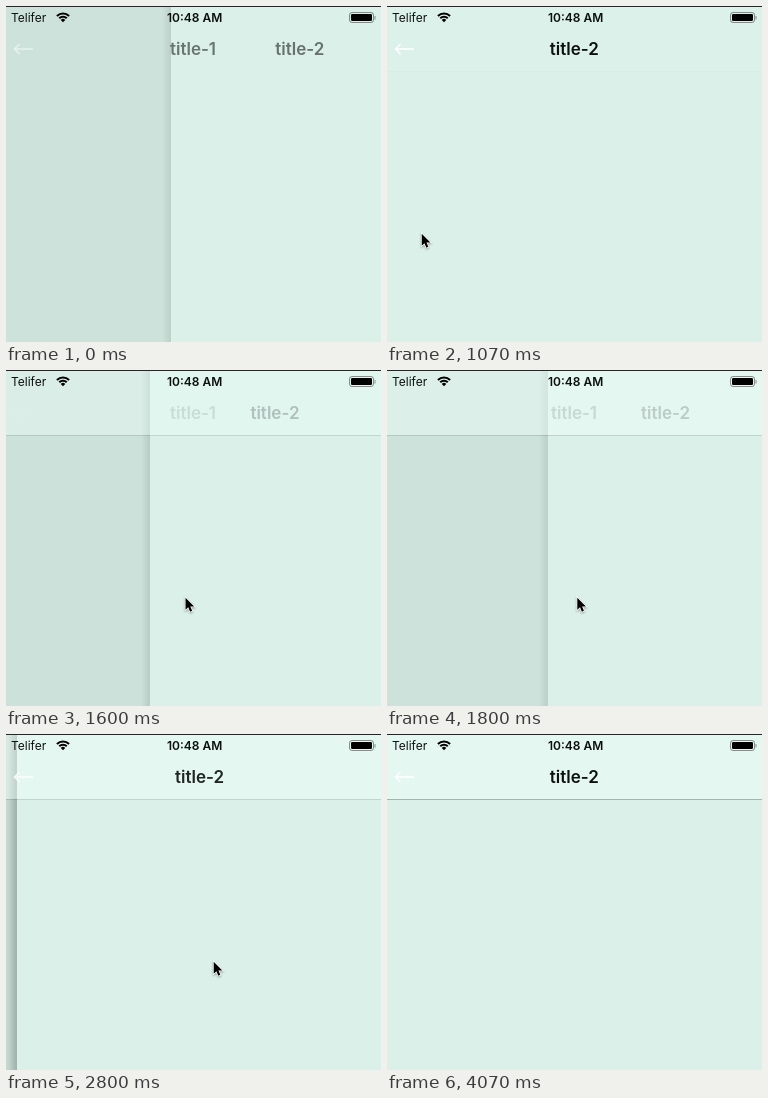
An HTML page with a canvas for the animation above (4340 ms loop, 375 by 336 pixels).

```html
<!DOCTYPE html>
<html lang="en">
<head>
<meta charset="utf-8">
<title>Swipe back</title>
<style>
  html, body { margin: 0; width: 100%; height: 100%; overflow: hidden; background: #daf0e8; }
  canvas { display: block; width: 375px; height: 336px; }
</style>
</head>
<body>
<canvas id="stage"></canvas>
<script>
const W = 375, H = 336, LOOP = 4340, STEP = 1000 / 15;
const PAGE = '#daf0e8';
const FONT = 'Inter, Roboto, sans-serif';

// Moments of the gesture, in steps of one fifteenth of a second.
const SHOW = 3, DRAG = 15, PAUSE = 28, NUDGE = 30, RELEASE = 40, LEAVE = 48, HIDE = 50;
const SPRING = 0.245; // share of the offset left after each step once released

const canvas = document.getElementById('stage');
const scale = window.devicePixelRatio || 1;
canvas.width = W * scale;
canvas.height = H * scale;
const c = canvas.getContext('2d');
c.scale(scale, scale);

const black = alpha => `rgba(0,0,0,${alpha})`;

// Ease-out progress from 0 to 1 between two steps.
function ease(step, from, to, power = 1) {
  const u = Math.min(1, Math.max(0, (step - from) / (to - from)));
  return 1 - (1 - u) ** power;
}

function springBack(offset, steps) {
  const left = offset * SPRING ** Math.max(0, steps);
  return left < 0.5 ? 0 : left;
}

function pageEdge(step) {
  if (step < DRAG) return springBack(165, step);
  const dragged = 162 * ease(step, DRAG + 1, PAUSE, 2) + 20.5 * ease(step, NUDGE, NUDGE + 2);
  return springBack(dragged, step - RELEASE);
}

function pointerPosition(step) {
  const exit = ease(step, LEAVE, HIDE);
  const approach = 1.65 * Math.max(0, 10 - step) ** 2;
  const drag = 189 * ease(step, DRAG, PAUSE, 2.4) + 17 * ease(step, NUDGE, NUDGE + 2);
  return [1 + approach + drag + 92 * exit, 226.5 - 88 * exit];
}

function rect(x, y, w, h, fill) {
  c.fillStyle = fill;
  c.fillRect(x, y, w, h);
}

function text(str, x, y, size, weight, align, alpha = 1) {
  c.font = `${weight} ${size}px ${FONT}`;
  c.textAlign = align;
  c.fillStyle = `rgba(12,16,15,${alpha})`;
  c.fillText(str, x, y);
}

const title = (str, x, alpha) => text(str, x, 49, 17, 600, 'center', alpha);

function drawPages(edge, p) {
  rect(0, 0, W, H, PAGE);
  if (edge <= 0) return;
  rect(0, 0, edge, H, black(0.105 * (1 - p)));
  const shadow = c.createLinearGradient(edge - 9, 0, edge, 0);
  shadow.addColorStop(0, black(0));
  shadow.addColorStop(1, black(0.2 * (1 - p) ** 1.5));
  rect(edge - 9, 0, 9, H, shadow);
}

function drawBar(step) {
  const shown = ease(step, DRAG, DRAG + 10);
  const settled = ease(step, RELEASE + 2, RELEASE + 6);
  rect(0, 0, W, 65, `rgba(240,255,252,${0.42 * shown})`);
  rect(0, 65, W, 1, black(0.12 * shown + 0.13 * settled));
}

function drawArrow(alpha) {
  c.strokeStyle = `rgba(255,255,255,${alpha})`;
  c.lineWidth = 1.5;
  c.stroke(new Path2D('M27 43H8.5M13.5 38L8.5 43L13.5 48'));
}

function drawWifi() {
  const from = -Math.PI * 0.75, to = -Math.PI * 0.25;
  c.strokeStyle = c.fillStyle = '#000';
  c.lineWidth = 2;
  for (const radius of [8.6, 5.3]) {
    c.beginPath();
    c.arc(57, 16, radius, from, to);
    c.stroke();
  }
  c.beginPath();
  c.moveTo(57, 16.2);
  c.arc(57, 16.2, 3.2, from, to);
  c.fill();
}

function drawBattery() {
  c.beginPath();
  c.roundRect(343.5, 6.5, 24, 10, 2.5);
  c.strokeStyle = black(0.42);
  c.lineWidth = 1;
  c.stroke();
  c.beginPath();
  c.roundRect(345, 8, 21, 7, 1.2);
  c.fillStyle = '#000';
  c.fill();
  rect(368.5, 10, 1, 3.5, black(0.42));
}

function drawStatus() {
  rect(0, 0, W, 1, '#222826');
  text('Telifer', 5, 16, 12, 400, 'left');
  text('10:48 AM', 188.7, 16, 12, 600, 'center');
  drawWifi();
  drawBattery();
}

const pointerShape = new Path2D('M0 0V14.2L3.2 11.2L5.4 16.4L7.8 15.4L5.6 10.4H10.2Z');

function drawPointer(x, y) {
  c.save();
  c.translate(x + 0.7, y + 1.2);
  c.scale(0.85, 0.85);
  c.shadowColor = black(0.35);
  c.shadowBlur = 2;
  c.shadowOffsetY = 1;
  c.strokeStyle = '#fff';
  c.lineWidth = 1.8;
  c.stroke(pointerShape);
  c.shadowColor = 'transparent';
  c.fillStyle = '#000';
  c.fill(pointerShape);
  c.restore();
}

function draw(time) {
  const step = Math.floor((time % LOOP + 4) / STEP);
  const edge = pageEdge(step), p = edge / W;
  const bar = step >= DRAG;

  drawPages(edge, p);
  if (bar) drawBar(step);
  drawArrow((1 - p) ** (bar ? 5 : 1));
  title('title-1', 187, p * (bar ? 0.3 : 1.25));
  title('title-2', 187.3 + edge * (bar ? 0.567 : 0.645), (1 - p) ** (bar ? 3 : 1));
  drawStatus();
  if (step >= SHOW && step <= HIDE) drawPointer(...pointerPosition(step));
}

const start = performance.now();
function tick() {
  draw(performance.now() - start);
  requestAnimationFrame(tick);
}
tick();
</script>
</body>
</html>
```
